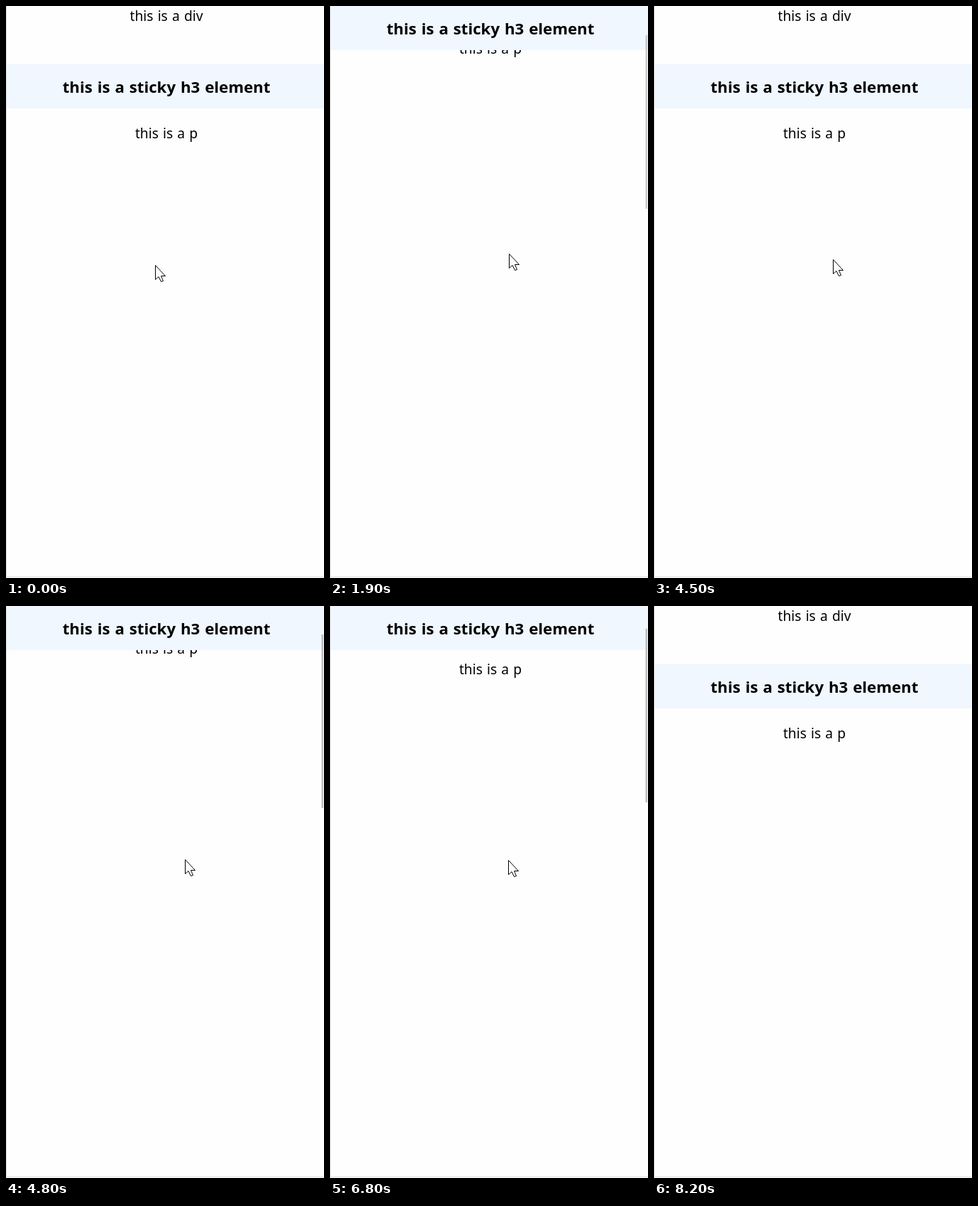
Recreate the animation shown at these times as an HTML page with a canvas. Size 448x804 px, loop 8.3 s.

```html
<!DOCTYPE html>
<html lang="en">
<head>
<meta charset="utf-8">
<title>Sticky heading</title>
<style>
  html, body { margin: 0; width: 448px; height: 804px; overflow: hidden; background: #fff; }
  canvas { display: block; }
</style>
</head>
<body>
<canvas id="stage" width="448" height="804"></canvas>
<script>
const ctx = document.getElementById('stage').getContext('2d');
const LOOP = 8300, STEP = 100;
const NOTCH = 119;      // pixels per wheel notch
const GLIDE = 310;      // duration of one smooth scroll
const BAR_RATIO = 0.307;
const HEADING_TOP = 82, HEADING_HEIGHT = 62;

// Smooth scrolls: start time and the notch they glide to.
const scrolls = [
  [1200, 1], [1900, 4], [2400, 7], [3300, 0], [4500, 1],
  [5000, 4], [5400, 8], [6000, 4], [6400, 1], [6700, 0]
];
// Pointer moves: start, duration, x, y.
const moves = [
  [0, 200, 214, 381], [300, 500, 252, 348], [2400, 100, 252, 353],
  [4300, 200, 252, 356], [5400, 100, 251, 357], [7100, 400, 248, 334]
];

const clamp = u => Math.min(1, Math.max(0, u));
const smooth = u => u * u * (3 - 2 * u);
const mix = (a, b, u) => a + (b - a) * u;

function scrollAt(t) {
  return NOTCH * scrolls.reduce(
    (pos, [start, notch]) => mix(pos, notch, smooth(clamp((t - start) / GLIDE))), 0);
}

function pointerAt(t) {
  return moves.reduce(([x, y], [start, duration, toX, toY]) => {
    const u = clamp((t - start) / duration);
    return [mix(x, toX, u), mix(y, toY, u)];
  }, [210, 364]);
}

// The scrollbar shows while scrolling and fades out shortly afterwards.
function barAlpha(t) {
  const last = scrolls.filter(([start]) => start < t).pop();
  return last ? clamp((560 + GLIDE - (t - last[0])) / 210) : 0;
}

function rect(color, x, y, w, h) {
  ctx.fillStyle = color;
  ctx.fillRect(x, y, w, h);
}

function label(text, y, font) {
  ctx.font = font + ' "Noto Sans", "Open Sans", sans-serif';
  ctx.wordSpacing = '1.2px';
  ctx.textAlign = 'center';
  ctx.fillStyle = '#000';
  ctx.fillText(text, 226, y);
}

function drawPointer(x, y) {
  const arrow = [[0, 0], [0, 20], [4.5, 16], [8, 23], [11, 22], [8, 15], [14, 15]];
  ctx.save();
  ctx.translate(Math.round(x) + 0.5, Math.round(y) + 0.5);
  ctx.beginPath();
  arrow.forEach(p => ctx.lineTo(...p));
  ctx.closePath();
  ctx.fillStyle = '#fff';
  ctx.fill();
  ctx.strokeStyle = '#000';
  ctx.lineJoin = 'bevel';
  ctx.stroke();
  ctx.restore();
}

function draw(t) {
  const offset = scrollAt(t);
  const scroll = Math.round(offset);
  const headingTop = Math.max(0, HEADING_TOP - scroll);

  rect('#fefefe', 0, 0, 448, 804);
  label('this is a div', 21 - scroll, '19.2px');
  label('this is a p', 186 - scroll, '19.2px');
  rect('#f0f7ff', 0, headingTop, 448, HEADING_HEIGHT);
  label('this is a sticky h3 element', headingTop + 40, 'bold 22.2px');

  rect('#dedede', 0, 0, 1, 803);
  rect('#dedede', 0, 802, 448, 1);

  ctx.globalAlpha = barAlpha(t);
  rect('#bdbdbd', 444.5, Math.round(4 + offset * BAR_RATIO), 2.5, 244);
  ctx.globalAlpha = 1;

  if (t < 8200) drawPointer(...pointerAt(t));
}

const start = performance.now();
function tick() {
  const t = (performance.now() - start) % LOOP;
  draw(Math.floor(t / STEP) * STEP);
  requestAnimationFrame(tick);
}
tick();
</script>
</body>
</html>
```
